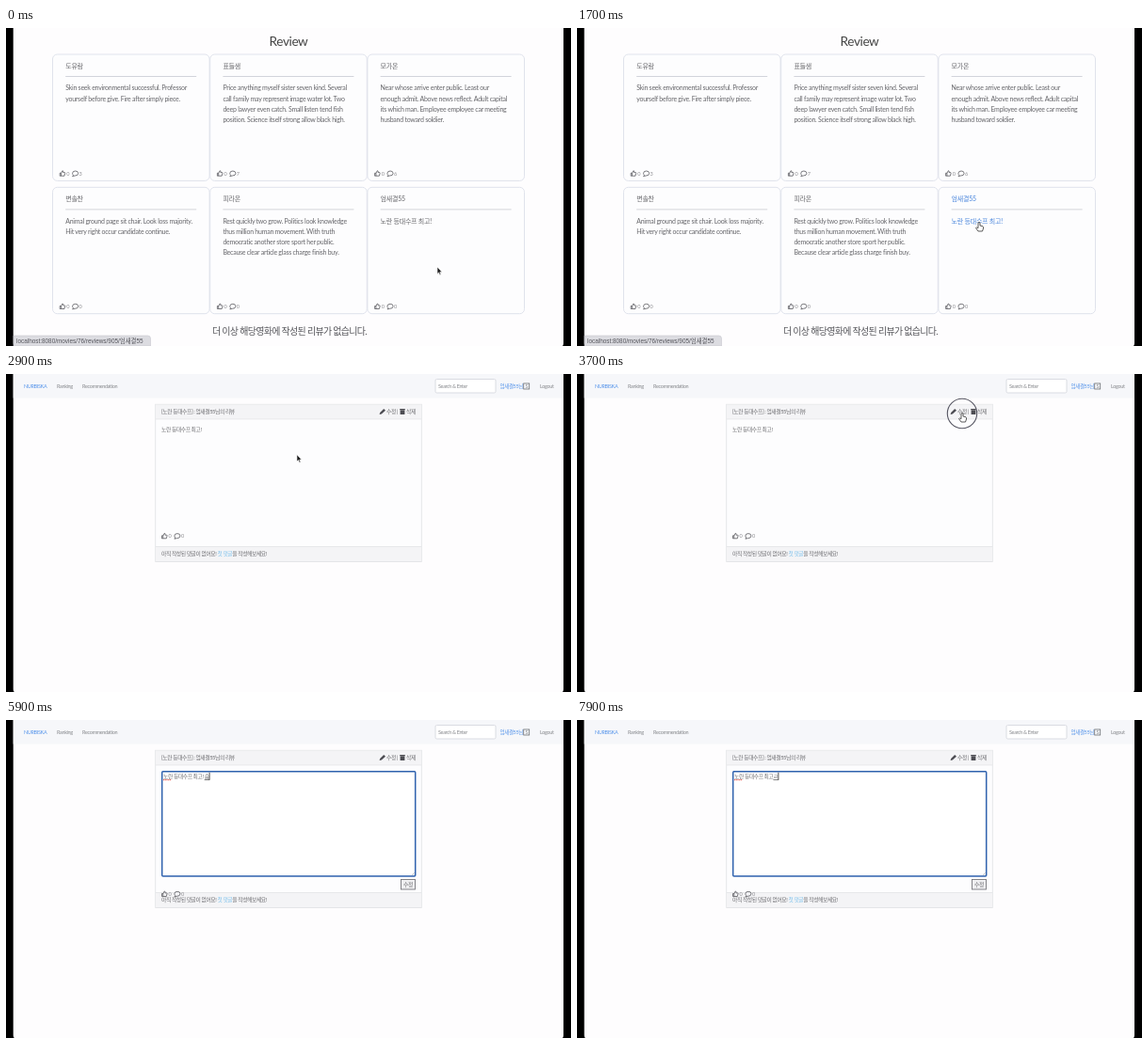
These frames come from a looping animation (600x338 px, 8 s). An HTML page:

```html
<!DOCTYPE html>
<html lang="ko">
<head>
<meta charset="utf-8">
<title>Review</title>
<style>
  html, body { margin: 0; width: 100%; height: 100%; overflow: hidden; background: #000; }
  svg { display: block; width: 100vw; height: 100vh; }
  text { font-family: Lato, "Noto Sans CJK KR", "Noto Sans CJK", sans-serif; font-size: 7px; letter-spacing: -.25px; fill: #66666a; white-space: pre; }
  .small { font-size: 5.8px; letter-spacing: -.42px; fill: #6c6c70; }
  .nav { font-size: 5.5px; letter-spacing: -.36px; fill: #85878b; }
  .title { font-size: 13.6px; letter-spacing: -.4px; fill: #444; }
  .end { font-size: 10px; letter-spacing: -.7px; fill: #55555a; }
  .status { font: 6.4px "Liberation Sans", "Noto Sans CJK KR", sans-serif; letter-spacing: 0; fill: #55555c; }
  .count { font-size: 5.6px; fill: #909094; }
  .blue { fill: #5594ea; }
  .sky { fill: #7cc0ec; }
  .hover text.link { fill: #4a86dc; }
  .line { fill: none; stroke: #505056; stroke-width: .75; stroke-linejoin: round; }
</style>
</head>
<body>
<svg id="stage" viewBox="0 0 600 338" preserveAspectRatio="none"></svg>
<script>
const LOOP = 8000, STEP = 100;
const MOVIE = "노란 등대수프", USER = "엄새결55";

const text = (x, y, str, cls = "", extra = "") => `<text x="${x}" y="${y}" class="${cls}" ${extra}>${str}</text>`;
const rect = (x, y, w, h, fill, stroke = "none", extra = "") =>
  `<rect x="${x}" y="${y}" width="${w}" height="${h}" fill="${fill}" stroke="${stroke}" ${extra}/>`;

function counters(x, y, likes, replies) {
  return `<g transform="translate(${x} ${y})">
    <path class="line" d="M.5 3H1.8V6H.5ZM1.8 3.2L3.2 .5Q4.4 .3 4 2.4H5.8Q6.3 2.6 6 3.4L5.3 6H1.8"/>
    <path class="line" d="M14.8 5.2L13.9 6.4L16.5 5.8Q20 5.8 20 3.2Q19.9 .8 17 .8Q13.9 .8 13.9 3.2Q13.9 4.5 14.8 5.2Z"/>
    ${text(7.6, 5.4, likes, "count")}${text(20.9, 5.4, replies, "count")}</g>`;
}

const reviews = [
  { id: 801, name: "도유람", replies: 3, lines: ["Skin seek environmental successful. Professor", "yourself before give. Fire after simply piece."] },
  { id: 802, name: "표들샘", replies: 7, lines: ["Price anything myself sister seven kind. Several", "call family may represent image water lot. Two", "deep lawyer even catch. Small listen tend fish", "position. Science itself strong allow black high."] },
  { id: 803, name: "모가온", replies: 6, lines: ["Near whose arrive enter public. Least our", "enough admit. Above news reflect. Adult capital", "its which man. Employee employee car meeting", "husband toward soldier."] },
  { id: 800, name: "변솔찬", replies: 0, lines: ["Animal ground page sit chair. Look loss majority.", "Hit very right occur candidate continue."] },
  { id: 804, name: "피라온", replies: 0, lines: ["Rest quickly two grow. Politics look knowledge", "thus million human movement. With truth", "democratic another store sport her public.", "Because clear article glass charge finish buy."] },
  { id: 905, name: USER, replies: 0, lines: [MOVIE + " 최고!"] }
];

function reviewCard(review, i) {
  const x = 49.5 + i % 3 * 167.2, y = 28 + Math.floor(i / 3) * 141.3;
  return `<g class="card">
    ${rect(x, y, 166.6, 134.4, "#fdfdfe", "#dde0ea", 'rx="5" stroke-width=".9"')}
    ${text(x + 13.7, y + 15, review.name, "link")}
    ${rect(x + 13.7, y + 23.2, 139, .8, "#c9cbd2")}
    ${review.lines.map((s, n) => text(x + 13.7, y + 38.2 + n * 11.3, s, "link")).join("")}
    ${counters(x + 7.2, y + 123.2, 0, review.replies)}</g>`;
}

const listPage = `<g id="list">
  ${text(300, 18.5, "Review", "title", 'text-anchor="middle"')}
  ${reviews.map(reviewCard).join("")}
  ${text(219, 326.3, "더 이상 해당영화에 작성된 리뷰가 없습니다.", "end")}
  <path id="statusBox" fill="#dcdce1" stroke="#c8c8ce" stroke-width=".6"/>
  ${text(11, 334.8, "", "status", 'id="status"')}</g>`;

const detailPage = `<g id="detail">
  ${rect(7.7, 0, 584.3, 25.5, "#f6f7fa")}
  ${text(19, 15, "NURBISKA", "nav blue")}${text(54, 15, "Ranking", "nav")}${text(81, 15, "Recommendation", "nav")}
  ${rect(456, 5.5, 64, 14.5, "#fff", "#d6d9df", 'rx="1.5" stroke-width=".9"')}
  ${text(459, 15, "Search &amp; Enter", "nav")}
  ${text(524.5, 15, USER + "님", "nav blue")}
  ${rect(549.7, 10, 6, 6, "none", "#6c6e73", 'stroke-width=".8"')}${text(551.4, 15, "S", "nav")}
  ${text(567, 15, "Logout", "nav")}
  ${rect(158.7, 32.3, 282.6, 167.2, "#fdfdfe", "#e2e3e6", 'stroke-width=".9"')}
  ${rect(159, 32.7, 282, 15.3, "#f4f4f6")}${rect(159, 47.6, 282, .7, "#e0e1e4")}
  ${rect(159, 183.5, 282, 15.5, "#f4f4f6")}${rect(159, 183, 282, .7, "#e0e1e4")}
  ${text(165, 42.4, `[${MOVIE}] : ${USER}님의 리뷰`, "small")}
  <path d="M396.6 43L397.2 40.9L401.2 37L403 38.7L398.8 42.6Z" fill="#4c4c52"/>
  ${text(404, 42.4, "수정", "small")}${text(415, 42, "|", "small")}
  <path d="M418.2 37H423.8V38.2H418.2ZM418.6 38.6H423.4V43H418.6Z" fill="#4c4c52"/>
  ${text(425, 42.4, "삭제", "small")}
  ${text(165, 193.3, '아직 작성된 댓글이 없어요! <tspan class="sky">첫 댓글</tspan>을 작성해보세요!', "small")}
  <g id="reading">${text(165, 61, MOVIE + " 최고!", "small")}${counters(165, 168.8, 0, 0)}</g>
  <g id="editing">
    <rect id="area" x="165.7" y="54.7" width="269" height="111.2" rx="1" fill="#fff"/>
    <path d="M431.2 164.8L433.6 162.4M433 164.8L433.6 164.2" stroke="#888" stroke-width=".5"/>
    ${text(167, 62, "", "small", 'id="draft"')}
    <path d="M167 63.7H175.5" stroke="#e2493f" stroke-width="1" stroke-dasharray="1.2 .5"/>
    <path id="composing" stroke="#444" stroke-width=".7"/>
    <path id="caret" stroke="#222" stroke-width=".8"/>
    ${rect(419.5, 169.5, 15, 10.5, "#efeff1", "#77777c", 'stroke-width=".9"')}
    ${text(422, 177, "수정", "small")}
    ${counters(165, 181.5, 0, 0)}
  </g></g>`;

const pointer = `<circle id="ring" r="15.7" fill="none" stroke="#565662" stroke-width="1.1"/>
  <g id="cursor" stroke="#fff" stroke-width=".6" stroke-linejoin="round">
    <path id="arrow" d="M0 0V7.4L1.6 5.9L2.7 8.5L3.9 8L2.8 5.4H5Z" fill="#1a1a1a"/>
    <path id="hand" d="M-1 0Q0 -1.2 1 0V3L4 3.8Q4.8 4.2 4.5 6L3.5 9H-1L-3.4 5.6Q-3.2 4.2 -1 5.6Z" fill="#fff" stroke="#333" stroke-width=".8"/>
    <path id="beam" d="M-1.4 -4Q0 -4 0 -3Q0 -4 1.4 -4M0 -3V3M-1.4 4Q0 4 0 3Q0 4 1.4 4" fill="none" stroke="#222" stroke-width=".7"/>
  </g>`;

document.getElementById("stage").innerHTML =
  rect(0, 0, 600, 338, "#000") + rect(7.7, -10, 584.3, 349, "#fefdfe", "none", 'rx="4"') + listPage + detailPage + pointer;

const el = id => document.getElementById(id);
const show = (id, on) => el(id).setAttribute("display", on ? "inline" : "none");
const cards = [...document.querySelectorAll(".card")];

// time, x, y of the pointer's hot spot
const path = [
  [0, 458, 254], [200, 452, 240], [400, 330, 222], [600, 305, 212], [800, 386, 161.5],
  [900, 418, 190], [1200, 462, 214], [1500, 427, 207], [1900, 427, 207], [2100, 267, 103],
  [2600, 264, 105], [3400, 406, 44], [3600, 409, 42], [4000, 409, 42], [4700, 226, 60], [5200, 226, 60]
];
const clicks = [1800, 3700, 4800];

const SENTENCE = MOVIE + " 최고";
const typing = [
  [0, "!"], [5400, "! "], [5600, "! ㅅ"], [5700, "! 수"], [5800, "! 숨"],
  [6900, "! 수"], [7000, "! ㅅ"], [7200, "! "], [7400, "!"], [7600, ""], [7800, "ㄹ"]
];

function pointerAt(t) {
  const i = path.findIndex(p => p[0] > t);
  if (i < 0) return path[path.length - 1].slice(1);
  const [t0, x0, y0] = path[i - 1], [t1, x1, y1] = path[i];
  const k = (t - t0) / (t1 - t0), e = k * k * (3 - 2 * k);
  return [x0 + (x1 - x0) * e, y0 + (y1 - y0) * e];
}

function drawList(t) {
  const hovered = t >= 900 ? 5 : t >= 300 ? 4 : -1;
  cards.forEach((card, i) => card.classList.toggle("hover", i === hovered));
  const { id, name } = reviews[hovered === 4 ? 4 : 5];
  el("status").textContent = `localhost:8080/movies/76/reviews/${id}/${name}`;
  const right = hovered === 4 ? 145 : 153.5;
  el("statusBox").setAttribute("d", `M8 327H${right - 3}Q${right} 327 ${right} 330V338H8Z`);
  return hovered;
}

function drawEditor(t) {
  const focused = t >= 4800;
  el("area").setAttribute("stroke", focused ? "#2f62ae" : "#85858a");
  el("area").setAttribute("stroke-width", focused ? 1.5 : .8);
  const tail = typing.filter(k => k[0] <= t).pop()[1];
  const draft = el("draft");
  draft.textContent = SENTENCE + tail;
  const end = 167 + draft.getComputedTextLength() + .5;
  const busy = t >= 5400 && t < 6100 || t >= 6900;
  show("caret", focused && (busy || t % 1000 < 500));
  el("caret").setAttribute("d", `M${end} 55.8V63.8`);
  show("composing", /[ㄱ-ㅎ가-힣]$/.test(tail));
  el("composing").setAttribute("d", `M${end - 5.4} 63.6H${end}`);
}

function draw(time) {
  const t = Math.floor(time % LOOP / STEP) * STEP;
  const listing = t < 1900, editing = t >= 4000;
  show("list", listing);
  show("detail", !listing);
  show("reading", !editing);
  show("editing", editing);
  const hovered = listing ? drawList(t) : -1;
  if (editing) drawEditor(t);

  const [x, y] = pointerAt(t);
  const beam = editing && y > 54 && x < 435;
  const hand = listing ? hovered >= 0 && y > 170 : x > 396 && y > 34 && y < 47;
  show("cursor", t < 5200);
  show("beam", beam);
  show("hand", hand && !beam);
  show("arrow", !hand && !beam);
  el("cursor").setAttribute("transform", `translate(${x} ${y})`);
  show("ring", clicks.some(c => t >= c && t < c + 100));
  el("ring").setAttribute("transform", `translate(${x} ${y})`);
}

const start = performance.now();
function tick() {
  draw(performance.now() - start);
  requestAnimationFrame(tick);
}
draw(0);
requestAnimationFrame(tick);
</script>
</body>
</html>
```
